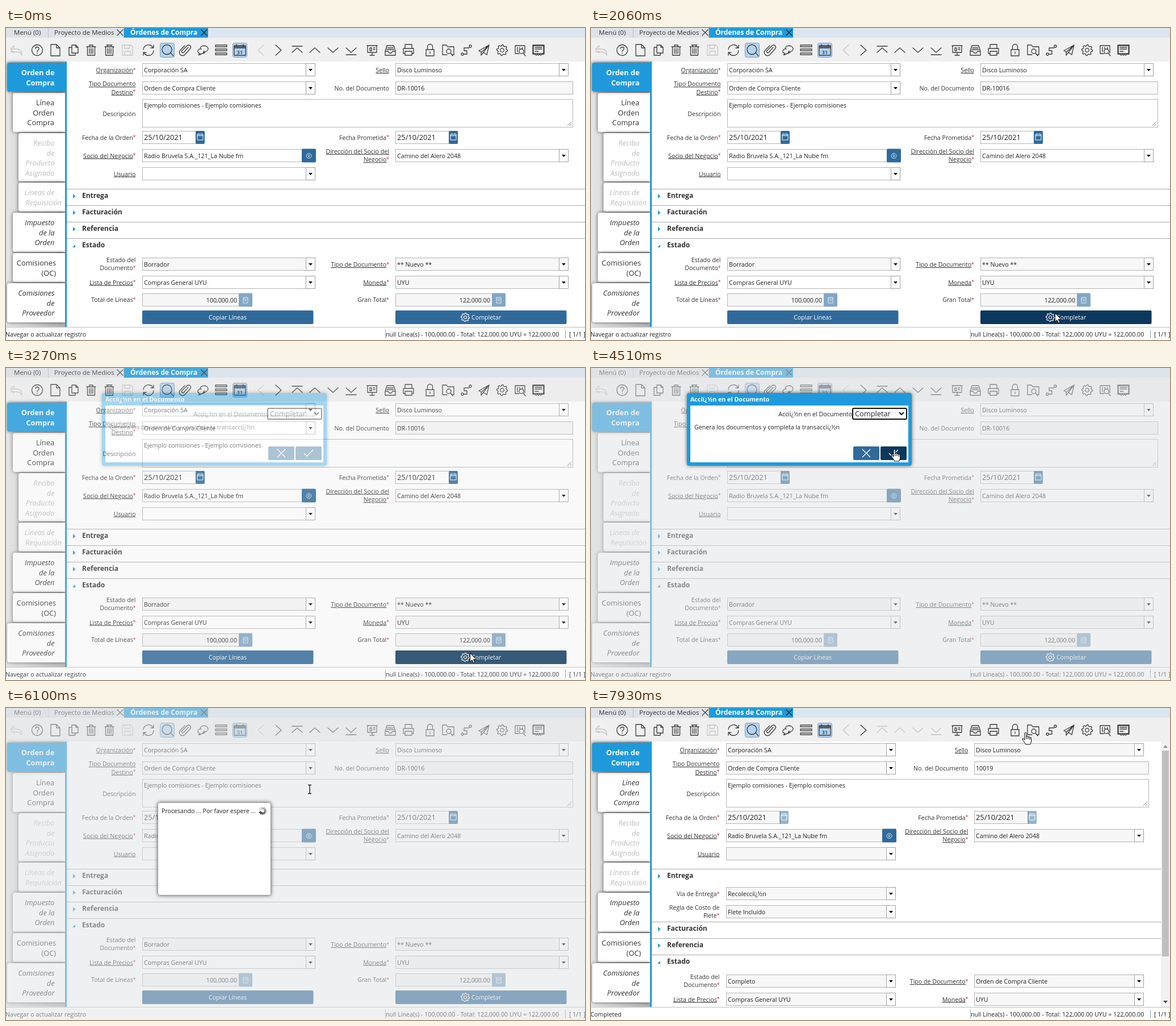
These frames come from a looping animation (1020x549 px, 8000 ms). An HTML page:

```html
<!DOCTYPE html>
<html lang="es">
<head>
<meta charset="utf-8">
<title>Órdenes de Compra</title>
<style>
html, body { margin: 0; width: 100%; height: 100%; overflow: hidden; background: #fff }
svg { display: block; width: 1020px; height: 549px }
text { font: 10.667px "Open Sans", sans-serif; fill: #333; white-space: pre }
.end { text-anchor: end }
.mid { text-anchor: middle }
.val { fill: #222 }
.big { font-size: 12.8px }
.bold { font-weight: 700 }
.head { font-size: 12px; font-weight: 700 }
.tab { font-size: 11.5px }
.day { font-size: 9px; font-weight: 700; fill: #2d5a88 }
.it { font-style: italic }
.white { fill: #fff }
.u { text-decoration: underline }
.req { font-size: 8.5px; fill: #b8281c }
.ico { fill: none; stroke: #3a3a3a; stroke-width: 1.3; stroke-linejoin: round; stroke-linecap: round }
.shadow { filter: drop-shadow(0 0 3px #0009) }

.before, .after, .ask, .busy, .hover, .ok, .arrow, .hand, .beam { animation: 8s step-end infinite }
.before { animation-name: before }
.after { animation-name: after }
.ask { animation-name: ask }
.busy { animation-name: busy }
.hover { animation-name: hover }
.ok { animation-name: ok }
.arrow { animation-name: arrow }
.hand { animation-name: hand }
.beam { animation-name: beam }
.cursor { animation: move 8s linear infinite }
.spin { animation: spin 1s steps(12) infinite }

@keyframes before { 0% { opacity: 1 } 77.1%, 100% { opacity: 0 } }
@keyframes after { 0% { opacity: 0 } 77.1%, 100% { opacity: 1 } }
@keyframes hover { 0% { fill: #306a9a } 24% { fill: #0c385d } 40.9%, 100% { fill: #306a9a } }
@keyframes ok { 0% { fill: #306a9a } 54%, 100% { fill: #0c385d } }
@keyframes ask {
  0% { opacity: 0 } 40.85% { opacity: .4 } 41.65% { opacity: .8 } 42.45% { opacity: 1 }
  62.2% { opacity: .6 } 63.1% { opacity: .25 } 64.8%, 100% { opacity: 0 }
}
@keyframes busy {
  0% { opacity: 0 } 66.6% { opacity: .4 } 67.45% { opacity: .8 } 68.3% { opacity: 1 } 77.1%, 100% { opacity: 0 }
}
@keyframes arrow { 0% { opacity: 1 } 54% { opacity: 0 } 91.5% { opacity: 1 } 96.2%, 100% { opacity: 0 } }
@keyframes hand { 0% { opacity: 0 } 54% { opacity: 1 } 64.8% { opacity: 0 } 96.2%, 100% { opacity: 1 } }
@keyframes beam { 0% { opacity: 0 } 64.8% { opacity: 1 } 91.5%, 100% { opacity: 0 } }
@keyframes move {
  0%, 6.1% { transform: translate(1030px, 560px) }
  6.12% { transform: translate(1004px, 546px) }
  7.7%, 12.8% { transform: translate(990px, 537px) }
  17.1%, 17.9% { transform: translate(888px, 474px) }
  19% { transform: translate(868px, 471px) }
  23.4% { transform: translate(823px, 498px) }
  24.6% { transform: translate(819px, 506px) }
  25.7%, 45.9% { transform: translate(817px, 501px) }
  48.4%, 52% { transform: translate(574px, 140px) }
  56.3%, 89.8% { transform: translate(535px, 143px) }
  96.5%, 98.3% { transform: translate(765px, 46px) }
  99%, 100% { transform: translate(766px, 43px) }
}
@keyframes spin { to { transform: rotate(360deg) } }
</style>
</head>
<body>
<svg id="stage" viewBox="0 0 1020 549"></svg>
<script>
const BLUE = '#1e9adc', STEEL = '#306a9a';

const text = (x, y, s, cls = '') => `<text x="${x}" y="${y}" class="${cls}">${s}</text>`;
const rect = (x, y, w, h, fill, more = '') => `<rect x="${x}" y="${y}" width="${w}" height="${h}" fill="${fill}" ${more}/>`;
const path = (d, more = '') => `<path d="${d}" ${more}/>`;
const at = (x, y, body, more = '') => `<g transform="translate(${x} ${y})" ${more}>${body}</g>`;
const group = (cls, body) => `<g class="${cls}">${body}</g>`;

// Right-aligned label; "_" underlines it and "*" marks it required
function label(x, y, s, flags = '') {
  const lines = s.split('|'), top = y - (lines.length - 1) * 7.2;
  return lines.map((line, i) => {
    const star = flags.includes('*') && i === lines.length - 1 ? '<tspan class="req" dy="-1.5">*</tspan>' : '';
    const name = flags.includes('_') ? `<tspan class="u">${line}</tspan>` : line;
    return text(x, top + i * 14.4, name + star, 'end');
  }).join('');
}

const box = (x, y, w, h, ro) => rect(x + .5, y + .5, w - 1, h - 1, ro ? '#f7f7f7' : '#fff', 'stroke="#b4b4b4"');
const field = (x, y, w, s, ro) => box(x, y, w, 23, ro) + text(x + 3, y + 16, s, 'val');
const combo = (x, y, w, s, ro) => field(x, y, w, s, ro) +
  rect(x + w - 16.5, y + .5, 16, 22, '#fff', 'stroke="#a0a0a0"') +
  path(`M${x + w - 12} ${y + 10}h7l-3.5 4z`, 'fill="#000"');

const area = (x, y, w, s) => box(x, y, w, 50) + text(x + 3, y + 15, s, 'val') +
  path(`M${x + w - 10} ${y + 47}l7-7m-3 7l3-3`, 'stroke="#777"');

function date(x, y, off) {
  const icon = rect(0, 0, 16, 23, STEEL, 'rx="2"') +
    path('M3 6h10v10h-10zM3 8.5h10M5.5 4.5v2M10.5 4.5v2', 'fill="none" stroke="#fff"');
  return box(x, y, 96, 23, off) + text(x + 3, y + 16, '25/10/2021', 'val big') +
    at(x + 94, y, icon, off ? 'opacity=".5"' : '');
}

const partner = (x, y, w, s, ro) => field(x, y, w - 22, s, ro) +
  rect(x + w - 24, y - .5, 25, 24, STEEL, 'rx="2"') +
  at(x + w - 11.5, y + 12, '<circle r="4.5"/><circle cy="-1" r="1.5"/><path d="M-2 3q2-4 4 0"/>', 'fill="none" stroke="#c3dbee"');

const total = (x, y, s) => box(x, y, 171, 23, true) + text(x + 167, y + 16, s, 'val end') +
  rect(x + 170, y - .5, 24, 24, '#83a6c4', 'rx="2"') +
  path(`M${x + 178} ${y + 7}h8v10h-8zM${x + 178} ${y + 10}h8M${x + 180} ${y + 13}h4`, 'fill="none" stroke="#dfeaf3"');

function section(y, s, right, open) {
  const mark = open ? `M117 ${y}h5v-5z` : `M118 ${y - 7}v8l4.5-4z`;
  return path(`M107 ${y - 15.5}H${right}`, 'stroke="#aaa"') + path(mark, `fill="${BLUE}"`) + text(134, y, s, 'head');
}

// Rows shared by both states of the form
function header(c) {
  const { l1, f1, l2, f2, w, wide, no, done } = c;
  return label(l1, 78, 'Organización', '_*') + combo(f1, 62, w, 'Corporación SA', done) +
    label(l2, 78, 'Sello', '_') + combo(f2, 62, w, 'Disco Luminoso', done) +
    label(l1, 109.5, 'Tipo Documento|Destino', '_*') + combo(f1, 94, w, 'Orden de Compra Cliente', done) +
    label(l2, 110, 'No. del Documento') + field(f2, 94, wide - f2, no, true) +
    label(l1, 154.5, 'Descripción') + area(f1, 125, wide - f1, 'Ejemplo comisiones - Ejemplo comisiones') +
    label(l1, 196.5, 'Fecha de la Orden', '*') + date(f1, 181, done) +
    label(l2, 196.5, 'Fecha Prometida', '*') + date(f2, 181, done) +
    label(l1, 228.5, 'Socio del Negocio', '_*') + partner(f1, 213, w, 'Radio Bruvela S.A._121_La Nube fm', done) +
    label(l2, 228, 'Dirección del Socio del|Negocio', '_*') + combo(f2, 213, w, 'Camino del Alero 2048', done) +
    label(l1, 260.5, 'Usuario', '_') + combo(f1, 245, w, '', done);
}

const state = (c, y, s, kind) => label(c.l1, y + 15, 'Estado del|Documento', '*') + combo(c.f1, y, c.w, s, true) +
  label(c.l2, y + 16, 'Tipo de Documento', '_*') + combo(c.f2, y, c.w, kind, true) +
  label(c.l1, y + 47.5, 'Lista de Precios', '_*') + combo(c.f1, y + 32, c.w, 'Compras General UYU', c.done) +
  label(c.l2, y + 47.5, 'Moneda', '_*') + combo(c.f2, y + 32, c.w, 'UYU', true);

const gearPath = Array.from({ length: 33 }, (_, i) => {
  const a = i * Math.PI / 16, r = i % 4 < 2 ? 9.6 : 7.4;
  return `${i ? 'L' : 'M'}${(r * Math.cos(a)).toFixed(1)} ${(r * Math.sin(a)).toFixed(1)}`;
}).join('');
const gear = path(gearPath) + '<circle r="3.3"/>';

function draft() {
  const c = { l1: 228.5, f1: 240, l2: 675, f2: 686, w: 305, wide: 999, no: 'DR-10016', done: false };
  return header(c) +
    section(299, 'Entrega', 1020) + section(328, 'Facturación', 1020) +
    section(357, 'Referencia', 1020) + section(386, 'Estado', 1020, true) +
    state(c, 404, 'Borrador', '** Nuevo **') +
    label(c.l1, 482, 'Total de Líneas', '*') + total(240, 467, '100,000.00') +
    label(c.l2, 482, 'Gran Total', '*') + total(686, 467, '122,000.00') +
    rect(240, 497, 301.5, 24, STEEL, 'rx="2"') + text(390.5, 513, 'Copiar Líneas', 'white mid') +
    rect(686, 497, 301.5, 24, STEEL, 'rx="2" class="hover"') + text(820, 512.5, 'Completar', 'white') +
    at(809, 509, `<g transform="scale(.78)">${gear}</g>`, 'fill="none" stroke="#fff" stroke-width="1.4"');
}

function completed() {
  const c = { l1: 226.5, f1: 238, l2: 664.5, f2: 675, w: 299, wide: 983, no: '10019', done: true };
  return header(c) +
    section(299, 'Entrega', 1004) +
    label(c.l1, 331, 'Vía de Entrega', '*') + combo(c.f1, 315, c.w, 'Recolecciï¿½n', true) +
    label(c.l1, 362, 'Regla de Costo de|Flete', '*') + combo(c.f1, 347, c.w, 'Flete Incluido', true) +
    section(392, 'Facturación', 1004) + section(421, 'Referencia', 1004) + section(450, 'Estado', 1004, true) +
    state(c, 469, 'Completo', 'Orden de Compra Cliente') +
    rect(1004, 59, 16, 467, '#f1f1f1') + rect(1006, 75, 12, 362, '#bfbfbf') +
    path('M1008 70h8l-4-4.5z', 'fill="#8a8a8a"') + path('M1008 515h8l-4 4.5z', 'fill="#444"');
}

const doc = 'M-8-10h10l6 6v14h-16zM2-10v6h6';
const bin = 'M-8-6h16M-3-6v-3h6v3M-6.5-6v15h13v-15M-3-3v9M0-3v9M3-3v9';
const icons = [
  [18, 'M-10-2h12q8 1 8 11q-3-6-9-6h-11M-10-2l6-6v4M-10-2l6 7v-3', 'off'],
  [55, 'M-9.5 0a9.5 9.5 0 1 0 19 0a9.5 9.5 0 1 0-19 0M-3-2.5q0-3 3-3t3 3q0 1.5-1.5 2.5t-1.5 2.5M0 5v.5'],
  [87, doc],
  [119, 'M-3-9h7l4 4v10h-11zM4-9v4h4M-3-5h-5v14h11v-4'],
  [150, bin],
  [182, bin + 'M-5-9h10'],
  [214, 'M-9-9h15l3 3v15h-18zM-5-9v6h9v-6M-5 9v-7h10v7', 'off'],
  [251, 'M-9-1a9 9 0 0 1 16-5l2 2M9-9v5h-5M9 1a9 9 0 0 1-16 5l-2-2M-9 9v-5h5'],
  [284, 'M-9-1a8.5 8.5 0 1 0 17 0a8.5 8.5 0 1 0-17 0M6 5l5 5', 'on'],
  [316, 'M5-5l-8 9a2 2 0 0 1-3-3l9-9a4 4 0 0 1 6 5l-10 11a5.5 5.5 0 0 1-8-8l8-8'],
  [347, 'M-5-3a7 5.5 0 1 1 9 6q-1 2-4 3l1-3M-3-2a5 4 0 1 0-2 8q-1 2-3 2q3 1 6-2q5-1 4-5'],
  [379, 'M-10-9h20v3h-20zM-10-2h20v3h-20zM-10 5h20v3h-20z'],
  [412, 'M-10-8h20v17h-20zM-10-4h20M-10-6h20M-6-10v4M6-10v4', 'on'],
  [449, 'M5-9l-10 9l10 9', 'off'],
  [480, 'M-5-9l10 9l-10 9'],
  [513, 'M-9-7h18M-9 4l9-8l9 8', 'nav'],
  [544, 'M-9 4l9-8l9 8', 'nav'],
  [576, 'M-9-4l9 8l9-8', 'nav'],
  [608, 'M-9-4l9 8l9-8M-9 8h18', 'nav'],
  [645, 'M-9-8h18M-8-8v12h16v-12M0 4v5M-4 9h8M-4-4h3v5h-3zM2-4h3M2-1h3'],
  [677, 'M-9 2l3-10h12l3 10v7h-18zM-9 2h5l2 3h4l2-3h5M-5-4h10M-6-1h12'],
  [709, 'M-6-3v-7h12v7M-9-3h18v9h-3M-6 6h-3v-9M-6 2h12v7h-12z'],
  [747, 'M-7-1h14v11h-14zM-4.5-1v-5a4.5 4.5 0 0 1 9 0v5M0 3v3'],
  [779, 'M-10 8v-17h7l2 3h11v14h-4M-10 8h8M-3 2a4 4 0 1 0 8 0a4 4 0 1 0-8 0M4 5l4 5'],
  [811, 'M-9 7a2 2 0 1 0 4 0a2 2 0 1 0-4 0M5-7a2 2 0 1 0 4 0a2 2 0 1 0-4 0M-5 7h6v-6h-5v-5h9'],
  [842, 'M-9 1l18-10l-4 17l-6-4l-4 5v-6zM-5 4l14-13l-10 13'],
  [874, ''],
  [906, 'M-9-8h17v13M-9-8v14h7M-5-5v8M-1-5v3M4-5v3M-2 2a4 4 0 1 0 8 0a4 4 0 1 0-8 0M5 5l4 5'],
  [938, 'M-10-9h20v16h-4l-2 2l-2-2l-2 2l-2-2l-2 2l-2-2h-4zM-9-8h18v14h-18zM-6-5h12M-6-2h12M-6 2h6']
];

const toolbar = rect(0, 17, 1020, 42, '#f0f0f0') + icons.map(([x, d, kind]) => {
  const lit = kind === 'on' ? rect(-12.5, -12.5, 25, 25, '#b5d2ee', 'rx="3" stroke="#7c9dc0" stroke-width="1"') : '';
  const glyph = lit + (d ? path(d) : gear);
  if (kind === 'nav') return group('before', at(x, 39, glyph, 'class="ico"')) +
    group('after', at(x, 39, glyph, 'class="ico" opacity=".22"'));
  return at(x, 39, glyph, `class="ico" opacity="${kind === 'off' ? .22 : 1}"`);
}).join('') + text(412, 45.5, '31', 'mid day');

const cross = (x, y, r, color) => path(`M${x - r} ${y - r}l${2 * r} ${2 * r}m0 ${-2 * r}l${-2 * r} ${2 * r}`, `stroke="${color}" stroke-width="1.3"`);
const tabs = rect(0, 0, 1020, 17, '#dbe6f1') + rect(0, 0, 208, 17, '#dfe3e8') +
  path('M74.5 0v17M207.5 0v17', 'stroke="#b8bec6"') + rect(208, 0, 148, 17, BLUE) +
  text(14, 12, 'Menú (0)', 'tab') + text(85, 12, 'Proyecto de Medios', 'tab') +
  text(219, 12, 'Órdenes de Compra', 'head white') + cross(201, 8, 5.5, '#444') + cross(349, 8, 5.5, '#222');

// Side tabs: left, top, height, lines, right edge of text, style
const side = [
  [12, 114, 69, 'Línea|Orden|Compra', 85, 'swap'],
  [22, 185, 85, 'Recibo|de|Producto|Asignado', 85.5, 'it dim'],
  [22, 272, 51, 'Líneas de|Requisición', 85.5, 'it dim'],
  [12, 325, 69, 'Impuesto|de la|Orden', 85.5, 'it'],
  [12, 396, 51, 'Comisiones|(OC)', 88, ''],
  [2, 449, 69, 'Comisiones|de|Proveedor', 85.5, 'it'],
  [2, 61, 51, 'Orden de|Compra', 85.5, 'bold white']
];
const sidebar = rect(0, 59, 104, 468, 'url(#side)') + side.map(([x, y, h, s, right, kind]) => {
  const top = kind.includes('white') ? BLUE : '#fff';
  const write = cls => s.split('|').map((line, i) =>
    text(line === 'Requisición' ? 98 : right, y + 22 + i * 17.5, line, 'big end ' + cls)).join('');
  const body = kind === 'swap' ? group('before', write('')) + group('after', write('it')) : write(kind);
  return path(`M104 ${y}H${x + 4}q-4 0-4 4v${h - 8}q0 4 4 4H104z`, `fill="${top}" class="shadow"`) +
    (kind.includes('dim') ? `<g opacity=".32">${body}</g>` : body);
}).join('') + rect(104, 59, 3, 468, BLUE);

const footer = rect(0, 526, 1020, 23, '#fff') + path('M0 526.5H1020', 'stroke="#b9bec4"') +
  path('M668.5 531v15M985.5 531v15', 'stroke="#8aa6bd"') +
  group('before', text(-1, 543, 'Navegar o actualizar registro', 'val')) +
  group('after', text(-1, 543, 'Completed', 'val')) +
  text(669, 543, 'null Línea(s) - 100,000.00 - Total: 122,000.00 UYU = 122,000.00', 'val') + text(992, 543, '[ 1/1 ]', 'val');

const veil = rect(0, 0, 1020, 549, '#e0e1e3', 'opacity=".5"');

const ask = veil + rect(169, 44, 396, 128, BLUE, 'rx="4" class="shadow"') + rect(175, 66, 384, 100, '#fff') +
  text(175, 59, 'Acciï¿½n en el Documento', 'bold white') +
  text(460, 85, 'Acciï¿½n en el Documento', 'val end') +
  rect(461, 71, 95, 19, '#fff', 'rx="2" stroke="#111" stroke-width="2"') + text(465, 85, 'Completar', 'big val') +
  path('M543 78l4 4l4-4', 'fill="none" stroke="#111" stroke-width="2"') +
  text(182, 108, 'Genera los documentos y completa la transacciï¿½n', 'val') +
  rect(462, 138, 46, 24, STEEL, 'rx="2"') + cross(485, 150, 7, '#fff') +
  rect(510, 138, 46, 24, STEEL, 'rx="2" class="ok"') +
  path('M525 150l5 5l11-11', 'fill="none" stroke="#fff" stroke-width="1.4"');

const spokes = Array.from({ length: 12 }, (_, i) =>
  `<path d="M0-3V-7" transform="rotate(${i * 30 - 120})" opacity="${(.1 + i * .08).toFixed(2)}"/>`).join('');
const busy = veil + rect(267.5, 166.5, 199, 163, '#fff', 'rx="3" stroke="#999" class="shadow"') +
  text(274, 184.5, 'Procesando ... Por favor espere ...', 'val') +
  at(452, 181, group('spin', spokes), 'stroke="#000" stroke-width="1.9"');

const outline = 'fill="#fff" stroke="#000" stroke-linejoin="round"';
const cursor = group('arrow', path('M.5 .5V16L4 12.7L6.5 18.2L8.8 17.2L6.4 11.8H11.3Z', outline)) +
  group('hand', path('M-2 13V1.5q0-1.5 1.5-1.5t1.5 1.5V8q0-1.5 1.5-1.5T4 8v1q0-1.5 1.5-1.5T7 9v1q0-1.2 1.3-1.2T9.6 10v5q0 3-2 6h-8q-1-3-3-5t-2.5-5q1.5-1.5 3.9 2z', outline) +
    path('M1 8v4M4 9v3M7 10v3', 'stroke="#000"')) +
  group('beam', path('M-3-7.5h2.5l.5 .5l.5-.5h2.5M0-7v14M-3 7.5h2.5l.5-.5l.5 .5h2.5', 'fill="none" stroke="#222" stroke-width="1.4"'));

document.getElementById('stage').innerHTML =
  '<defs><linearGradient id="side"><stop stop-color="#e6e6e6"/><stop offset="1" stop-color="#b4b4b4"/></linearGradient></defs>' +
  rect(0, 0, 1020, 549, '#fff') + group('before', draft()) + group('after', completed()) +
  tabs + toolbar + sidebar + footer + group('ask', ask) + group('busy', busy) + group('cursor', cursor);
</script>
</body>
</html>
```
